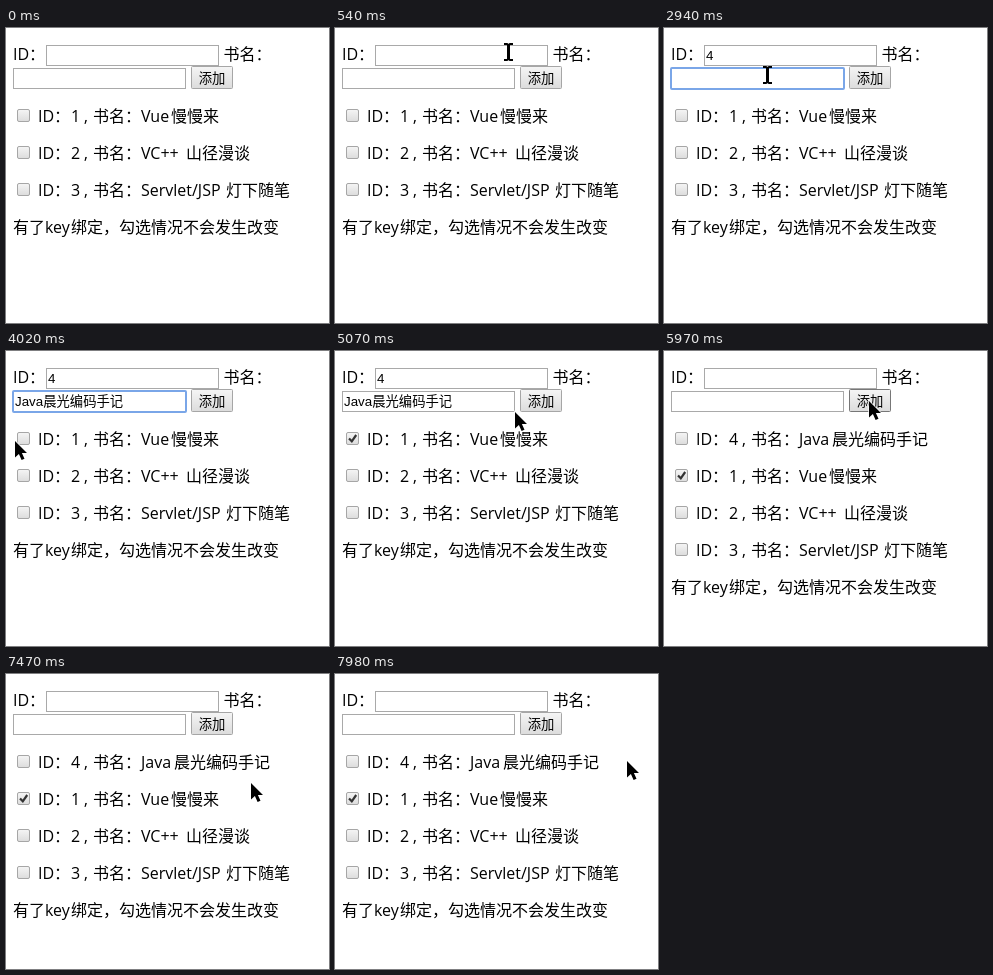
Recreate the animation shown at these times as an HTML page. Size 323 px wide and 295 px high, loop 8000 ms.

```html
<!DOCTYPE html>
<html lang="zh-CN">
<head>
<meta charset="utf-8">
<title>Book list</title>
<style>
html, body { margin: 0; width: 100%; height: 100%; overflow: hidden; background: #fff; }
svg { display: block; width: 323px; height: 295px; cursor: default; }
text { font: 16px "Open Sans", "Noto Sans CJK SC", "Noto Sans CJK", sans-serif; fill: #000; }
.small { font: 13.333px "Liberation Sans", "Noto Sans CJK SC", "Noto Sans CJK", sans-serif; }
.field { fill: #fff; stroke: #a9a9a9; }
.ring { fill: none; stroke: #7aa6e8; stroke-width: 2; }
.box { fill: url(#face); stroke: #a6a6a6; }
.hot { stroke: #777; }
.tick { fill: none; stroke: #333; stroke-width: 2.2; }
</style>
</head>
<body>
<svg id="stage" viewBox="0 0 323 295">
  <defs>
    <linearGradient id="face" x2="0" y2="1">
      <stop stop-color="#f5f5f5"/><stop offset="1" stop-color="#dcdcdc"/>
    </linearGradient>
    <linearGradient id="down" x2="0" y2="1">
      <stop stop-color="#d4d4d4"/><stop offset="1" stop-color="#e8e8e8"/>
    </linearGradient>
  </defs>
  <g id="form">
    <rect class="field" x="40.5" y="17.5" width="172" height="20"/>
    <rect class="field" x="7.5" y="40.5" width="172" height="20"/>
    <rect class="ring" id="ring1" x="40" y="17" width="173" height="21" rx="1"/>
    <rect class="ring" id="ring2" x="7" y="40" width="173" height="21" rx="1"/>
    <rect class="box" id="button" x="185.5" y="38.5" width="41" height="22" rx="1"/>
    <text class="small" x="192.7" y="54.7">添加</text>
    <text class="small" id="idText" x="42" y="32">4</text>
    <text class="small" id="nameText" x="9" y="55">Java晨光编码手记</text>
    <rect id="caret" width="1" height="15"/>
  </g>
  <g id="fresh"></g>
  <g id="list"></g>
  <g id="arrow">
    <path d="M0 0V16.6L3.9 13L6.6 19L9.5 17.8L6.9 12H12Z" stroke="#fff" stroke-width="1.4" paint-order="stroke"/>
  </g>
  <g id="beam" fill="none" stroke="#000">
    <path d="M-4 -8H-1L.5 -7L2 -8H5M-4 8H-1L.5 7L2 8H5" stroke-width="2"/>
    <path d="M.5 -7V7" stroke-width="3"/>
  </g>
</svg>
<script>
const $ = id => document.getElementById(id);
const LOOP = 8000, TICK = 30, ROW = 37;

// Each run is [x, string].
const line = (y, ...runs) => '<text>' +
  runs.map(([x, s]) => `<tspan x="${x}" y="${y}">${s}</tspan>`).join('') + '</text>';

const book = (n, y, latin, x, rest) =>
  `<rect class="box" x="11.5" y="${y - 12.5}" width="12" height="12" rx="1.5"/>` +
  line(y, [32, 'ID'], [48, '：'], [65, n], [78, ','], [87, '书名：'], [135, latin], [x, rest]);

$('form').insertAdjacentHTML('afterbegin',
  line(32, [7, 'ID'], [23, '：'], [217.5, '书名：']));
$('fresh').innerHTML = book(4, 94, 'Java', 168, '晨光编码手记');
$('list').innerHTML =
  book(1, 94, 'Vue', 165, '慢慢来') +
  '<path class="tick" id="tick" d="M14 87.5L16.8 90.3L21.2 84"/>' +
  book(2, 94 + ROW, 'VC++', 180, '山径漫谈') +
  book(3, 94 + 2 * ROW, 'Servlet/JSP', 220, '灯下随笔') +
  line(205, [7, '有了'], [39, 'key'], [65, '绑定，勾选情况不会发生改变']);
const firstBox = $('list').querySelector('.box');

// Pointer route: time, x, y
const route = [
  [0, 330, 20], [150, 330, 20], [180, 320, 20], [600, 149, 25],
  [1980, 149, 25], [2340, 103, 47],
  [3540, 103, 47], [3810, 10, 91], [3960, 10, 91], [4020, 9, 90], [4080, 6, 89], [4200, 16, 87],
  [4860, 16, 87], [5070, 180, 61], [5190, 198, 54], [5400, 205, 50],
  [6780, 205, 50], [7020, 105, 143], [7140, 43, 170], [7590, 319, 87], [7620, 330, 87],
  [7770, 330, 87], [7800, 318, 87], [7980, 292, 87], [8000, 292, 87]
];

function pointer(t) {
  const i = route.findIndex(p => p[0] > t);
  const [t0, x0, y0] = route[i - 1], [t1, x1, y1] = route[i];
  const k = (t - t0) / (t1 - t0);
  return [x0 + (x1 - x0) * k, y0 + (y1 - y0) * k];
}

const inside = (x, y, l, t, r, b) => x >= l && x < r && y >= t && y < b;

function overText(x, y) {
  if (inside(x, y, 7, 16, 262, 38) || inside(x, y, 7, 40, 180, 61)) return true;
  return x >= 32 && x < 270 && y >= 78 && (y - 78) % ROW < 21;
}

const show = (id, on) => $(id).style.display = on ? '' : 'none';
const between = (t, a, b) => t >= a && t < b;

function draw(t) {
  const added = t >= 5970;
  const [x, y] = pointer(t);

  show('fresh', added);
  $('list').setAttribute('transform', `translate(0 ${added ? ROW : 0})`);
  show('tick', t >= 4620);
  show('idText', between(t, 1350, 5970));
  show('nameText', between(t, 3210, 5970));
  show('ring1', between(t, 690, 2430));
  show('ring2', between(t, 2430, 4500));

  // The caret restarts its blink at each focus or key.
  const start = [3210, 2430, 1350, 690].find(s => t >= s);
  show('caret', t < 4500 && start && Math.floor((t - start) / 510) % 2 === 0);
  $('caret').setAttribute('x', t < 1350 ? 42 : t < 2430 ? 49 : t < 3210 ? 9 : 117);
  $('caret').setAttribute('y', t < 2430 ? 20 : t < 3210 ? 43 : 44);

  $('button').classList.toggle('hot', inside(x, y, 185, 38, 227, 61));
  $('button').style.fill = between(t, 5910, 5970) ? 'url(#down)' : '';
  firstBox.classList.toggle('hot', !added && inside(x, y, 11, 81, 24, 94));

  const text = overText(x, y);
  show('beam', text);
  show('arrow', !text);
  $(text ? 'beam' : 'arrow').setAttribute('transform', `translate(${Math.round(x)} ${Math.round(y)})`);
}

function frame() {
  const t = performance.now() % LOOP;
  draw(Math.floor(t / TICK) * TICK);
  requestAnimationFrame(frame);
}
frame();
</script>
</body>
</html>
```
